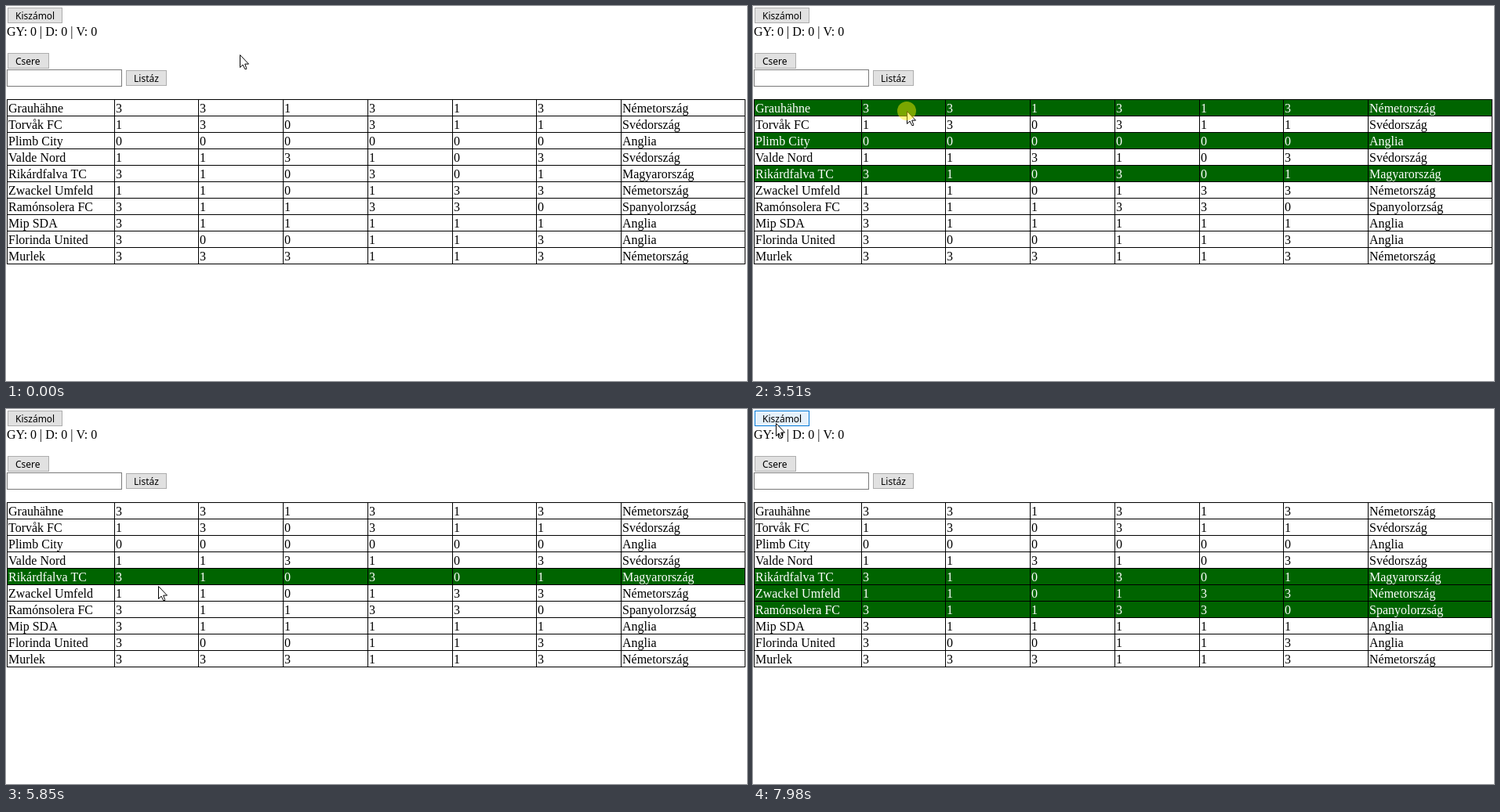
Write an HTML page with a canvas that moves like this. It is 945x479 px and loops after 8 s.

```html
<!DOCTYPE html>
<html lang="hu">
<head>
<meta charset="utf-8">
<title>Táblázat</title>
<style>
  html, body { margin: 0; width: 100%; height: 100%; overflow: hidden; background: #fff; }
  canvas { display: block; }
</style>
</head>
<body>
<canvas id="stage" width="945" height="479"></canvas>
<script>
const ctx = document.getElementById('stage').getContext('2d');
const LOOP = 8000;
const SERIF = '16px "Liberation Serif", serif';
const SANS = '12px "Noto Sans", "Open Sans", sans-serif';

const TOP = 119, ROW_H = 21;
const colX = c => c === 0 ? 1 : Math.floor(30.48 + 107.72 * c);
const TEAMS = [
  ['Grauhähne', '331313', 'Németország'],
  ['Torvåk FC', '130311', 'Svédország'],
  ['Plimb City', '000000', 'Anglia'],
  ['Valde Nord', '113103', 'Svédország'],
  ['Rikárdfalva TC', '310301', 'Magyarország'],
  ['Zwackel Umfeld', '110133', 'Németország'],
  ['Ramónsolera FC', '311330', 'Spanyolorzság'],
  ['Mip SDA', '311111', 'Anglia'],
  ['Florinda United', '300113', 'Anglia'],
  ['Murlek', '333113', 'Németország']
].map(([name, points, land]) => [name, ...points, land]);

// The pointer rests between moves; each press toggles the row under it on release.
const MOVES = [
  { from: 500, to: 1290, x: 213, y: 127 },
  { from: 1570, to: 1950, x: 213, y: 172 },
  { from: 2220, to: 2920, x: 200, y: 213 },
  { from: 3060, to: 3460, x: 196, y: 134 },
  { from: 3610, to: 3750, x: 196, y: 171 },
  { from: 3920, to: 4160, x: 196, y: 174 },
  { from: 5620, to: 6000, x: 194, y: 235 },
  { from: 6160, to: 6540, x: 191, y: 259 },
  { from: 6940, to: 7610, x: 61, y: 52 },
  { from: 7630, to: 7980, x: 29, y: 18 }
];
const HOLD = 110;
const PRESSES = [1390, 2130, 2950, 3500, 3800, 4540, 5110, 6040, 6820];

const easeOut = k => k * (2 - k);

function pointerAt(t) {
  let x = 298, y = 62;
  for (const m of MOVES) {
    const e = easeOut(Math.min(1, Math.max(0, (t - m.from) / (m.to - m.from))));
    x += (m.x - x) * e;
    y += (m.y - y) * e;
  }
  return { x: Math.round(x), y: Math.round(y) };
}

const CLICKS = PRESSES.map(press => ({
  press,
  release: press + HOLD,
  row: Math.floor((pointerAt(press).y - TOP) / ROW_H)
}));

function rect(x, y, w, h, color) {
  ctx.fillStyle = color;
  ctx.fillRect(x, y, w, h);
}

function box(x, y, w, h, fill, border) {
  rect(x, y, w, h, border);
  rect(x + 1, y + 1, w - 2, h - 2, fill);
}

function text(str, x, y, font = SERIF, color = '#000') {
  ctx.font = font;
  ctx.fillStyle = color;
  ctx.fillText(str, x, y);
}

const inside = (p, x, y, w, h) => p.x >= x && p.x < x + w && p.y >= y && p.y < y + h;

function button(label, x, y, w, pointer) {
  const hot = inside(pointer, x, y, w, 20);
  box(x, y, w, 20, hot ? '#e5f1fb' : '#e1e1e1', hot ? '#0078d7' : '#adadad');
  text(label, x + 10, y + 15, SANS);
}

function table(t) {
  TEAMS.forEach((cells, r) => {
    const y = TOP + r * ROW_H;
    const on = CLICKS.filter(c => c.row === r && t >= c.release).length % 2 === 1;
    if (on) rect(2, y + 1, 940, ROW_H - 1, '#006400');
    cells.forEach((cell, c) => {
      const x = colX(c) + 2;
      let color = on ? '#fff' : '#000';
      // digit selected by the repeated clicks
      if (r === 2 && c === 1 && t >= 4540 && t < 5160) {
        rect(x, y + 2, 8, 18, on ? '#fff' : '#0078d7');
        color = on ? '#0078d7' : '#fff';
      }
      text(cell, x, y + 17, SERIF, color);
    });
  });
  const rows = TEAMS.length, height = rows * ROW_H + 1;
  for (let r = 0; r <= rows; r++) rect(1, TOP + r * ROW_H, 942, 1, '#000');
  for (let c = 0; c < 8; c++) rect(colX(c), TOP, 1, height, '#000');
  rect(942, TOP, 1, height, '#000');
}

function arrow(x, y) {
  ctx.save();
  ctx.translate(x + 0.5, y + 0.5);
  const shape = new Path2D('M0 0V16L3.6 12.6L6.2 18H8.2V17L6.2 11.6H11Z');
  ctx.fillStyle = '#fff';
  ctx.fill(shape);
  ctx.strokeStyle = '#000';
  ctx.lineWidth = 1;
  ctx.stroke(shape);
  ctx.restore();
}

function beam(x, y) {
  rect(x, y - 8, 1, 16, '#000');
  rect(x - 3, y - 8, 7, 1, '#000');
  rect(x - 3, y + 7, 7, 1, '#000');
}

function draw(t) {
  const pointer = pointerAt(t), { x, y } = pointer;
  rect(0, 0, 945, 479, '#fff');
  button('Kiszámol', 2, 2, 70, pointer);
  text('GY: 0 | D: 0 | V: 0', 1, 38);
  button('Csere', 2, 60, 53, pointer);
  const overInput = inside(pointer, 1, 81, 147, 22);
  box(1, 81, 147, 22, '#fff', overInput ? '#171717' : '#7a7a7a');
  button('Listáz', 153, 82, 52, pointer);
  table(t);
  (overInput ? beam : arrow)(x, y);
  if (CLICKS.some(c => t >= c.press && t < c.release)) {
    ctx.beginPath();
    ctx.arc(x, y, 12, 0, Math.PI * 2);
    ctx.fillStyle = 'rgba(255, 240, 0, 0.48)';
    ctx.fill();
  }
}

const start = performance.now();
function tick() {
  draw((performance.now() - start) % LOOP);
  requestAnimationFrame(tick);
}
tick();
</script>
</body>
</html>
```
